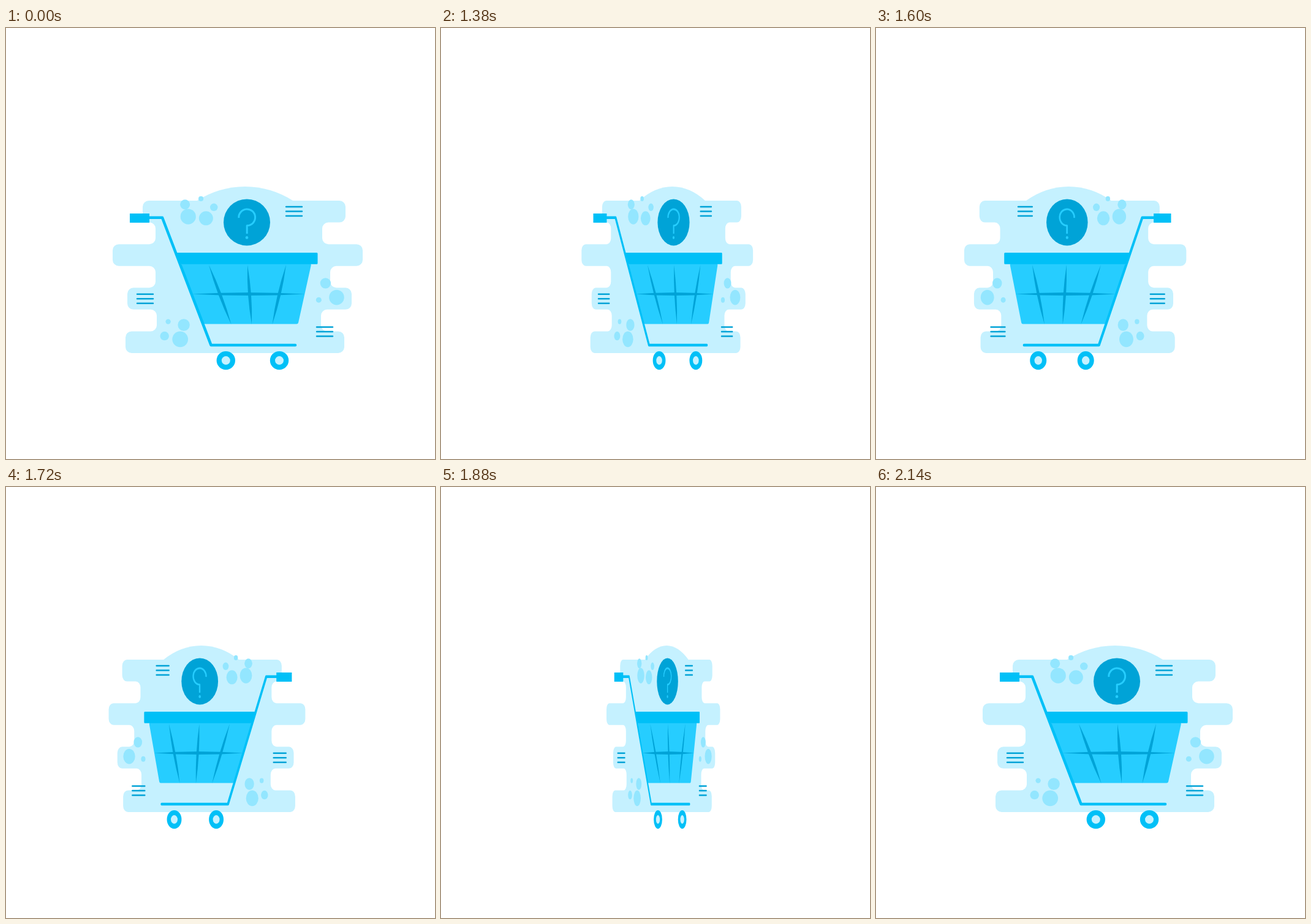
Recreate the animation shown at these times as an HTML page with a canvas. Size 700 by 704 pixels, loop 2.98 s.

```html
<!DOCTYPE html>
<html lang="en">
<head>
<meta charset="utf-8">
<title>Flipping cart</title>
<style>
  html, body { margin: 0; width: 100%; height: 100%; overflow: hidden; background: #fff; }
  canvas { display: block; }
</style>
</head>
<body>
<canvas id="stage" width="700" height="704"></canvas>
<script>
const ctx = document.getElementById('stage').getContext('2d');
const LOOP = 2980, STEP = 20, START = 1158, SPIN = 984, AXIS = 350;
const PALE = '#c5f1ff', BUBBLE = '#93e6ff', LIGHT = '#26cdff', MAIN = '#00c0f7', DARK = '#00a3d7';

// Background: evenly stacked bars, alternately wide and narrow
const rowY = i => 282 + i * 249 / 7;
const side = xs => xs.flatMap((x, i) => [[x, rowY(i)], [x, rowY(i + 1)]]);
const right = side([554, 516, 582, 529, 564, 514, 552]);
const left = side([223, 244, 174, 244, 198, 246, 195]);
const backdrop = roundedShape([...right, ...left.reverse()], 10);

const basket = roundedShape([[285, 384], [498.5, 384], [476.5, 483.5], [321, 483.5]], 3);
const rim = roundedShape([[277, 367], [508.5, 367], [508.5, 385.7], [284, 385.7]], 1.5);

function roundedShape(points, radius) {
  const path = new Path2D();
  const first = points[0], last = points[points.length - 1];
  path.moveTo((first[0] + last[0]) / 2, (first[1] + last[1]) / 2);
  points.forEach((p, i) => path.arcTo(...p, ...points[(i + 1) % points.length], radius));
  path.closePath();
  return path;
}

function fill(path, color) {
  ctx.fillStyle = color;
  ctx.fill(path);
}

function disc(x, y, r, color) {
  const path = new Path2D();
  path.arc(x, y, r, 0, Math.PI * 2);
  fill(path, color);
}

function stroke(points, width, color) {
  ctx.lineWidth = width;
  ctx.strokeStyle = color;
  ctx.beginPath();
  points.forEach(p => ctx.lineTo(...p));
  ctx.stroke();
}

// Sliver pointed at both ends and thickest in the middle
function sliver(x1, y1, x2, y2) {
  const bulge = 5 / Math.hypot(x2 - x1, y2 - y1);
  const dx = (y1 - y2) * bulge, dy = (x2 - x1) * bulge;
  const mx = (x1 + x2) / 2, my = (y1 + y2) / 2;
  const path = new Path2D();
  path.moveTo(x1, y1);
  path.quadraticCurveTo(mx + dx, my + dy, x2, y2);
  path.quadraticCurveTo(mx - dx, my - dy, x1, y1);
  fill(path, DARK);
}

// Ring of bubbles, largest towards the angle `heavy` (degrees)
function bubbleRing(x, y, rx, count, start, heavy) {
  for (let i = 0; i < count; i++) {
    const deg = start + i * 360 / count, a = deg * Math.PI / 180;
    const size = 8.5 + 4.5 * Math.cos((deg - heavy) * Math.PI / 180);
    disc(x + rx * Math.cos(a), y + 17 * Math.sin(a), size, BUBBLE);
  }
}

function stripes(x, y) {
  for (let i = 0; i < 3; i++)
    stroke([[x, y + i * 7.5], [x + 26, y + i * 7.5]], 2.4, DARK);
}

function drawBackdrop() {
  fill(backdrop, PALE);
  const dome = new Path2D();
  dome.arc(390, 403, 144, Math.PI * 1.5 - 0.58, Math.PI * 1.5 + 0.58);
  fill(dome, PALE);
  bubbleRing(314.6, 295.8, 25, 5, 62, 110);
  bubbleRing(274.4, 494, 18.5, 4, 58, 42);
  bubbleRing(523.7, 433.7, 17, 3, 22, -10);
  stripes(457, 292);
  stripes(214, 434.7);
  stripes(507, 488.5);
}

function drawQuestion() {
  disc(393, 317.4, 38, DARK);
  ctx.lineCap = 'butt';
  ctx.lineWidth = 3;
  ctx.strokeStyle = LIGHT;
  ctx.beginPath();
  ctx.arc(393.2, 309.3, 13.4, Math.PI * 0.98, Math.PI * 2.5);
  ctx.lineTo(393.2, 336);
  ctx.stroke();
  ctx.lineCap = 'round';
  disc(393, 342.4, 2.3, LIGHT);
}

function drawCart() {
  fill(basket, LIGHT);
  sliver(303, 434.6, 488, 434.6);
  for (let i = 0; i < 3; i++) sliver(331 + i * 63, 387, 367.5 + i * 33.5, 484);
  fill(rim, MAIN);
  stroke([[232, 309.7], [255, 309.7], [334.5, 517.9], [472, 517.9]], 4.5, MAIN);
  ctx.fillRect(202, 303, 32, 15);
  for (const x of [358.8, 446]) {
    disc(x, 543.1, 15.2, MAIN);
    disc(x, 543.1, 7, PALE);
  }
}

function draw(now) {
  const time = Math.floor(now % LOOP / STEP) * STEP;
  const u = Math.min(1, Math.max(0, (time - START) / SPIN));
  const turn = u * u * (3 - 2 * u);
  const squash = Math.cos(turn * Math.PI * 2);
  ctx.setTransform(1, 0, 0, 1, 0, 0);
  ctx.clearRect(0, 0, 700, 704);
  ctx.setTransform(squash, 0, 0, 1, AXIS * (1 - squash), 0);
  ctx.lineCap = ctx.lineJoin = 'round';
  drawBackdrop();
  drawQuestion();
  drawCart();
}

const begin = performance.now();
function tick() {
  draw(performance.now() - begin);
  requestAnimationFrame(tick);
}
tick();
</script>
</body>
</html>
```
